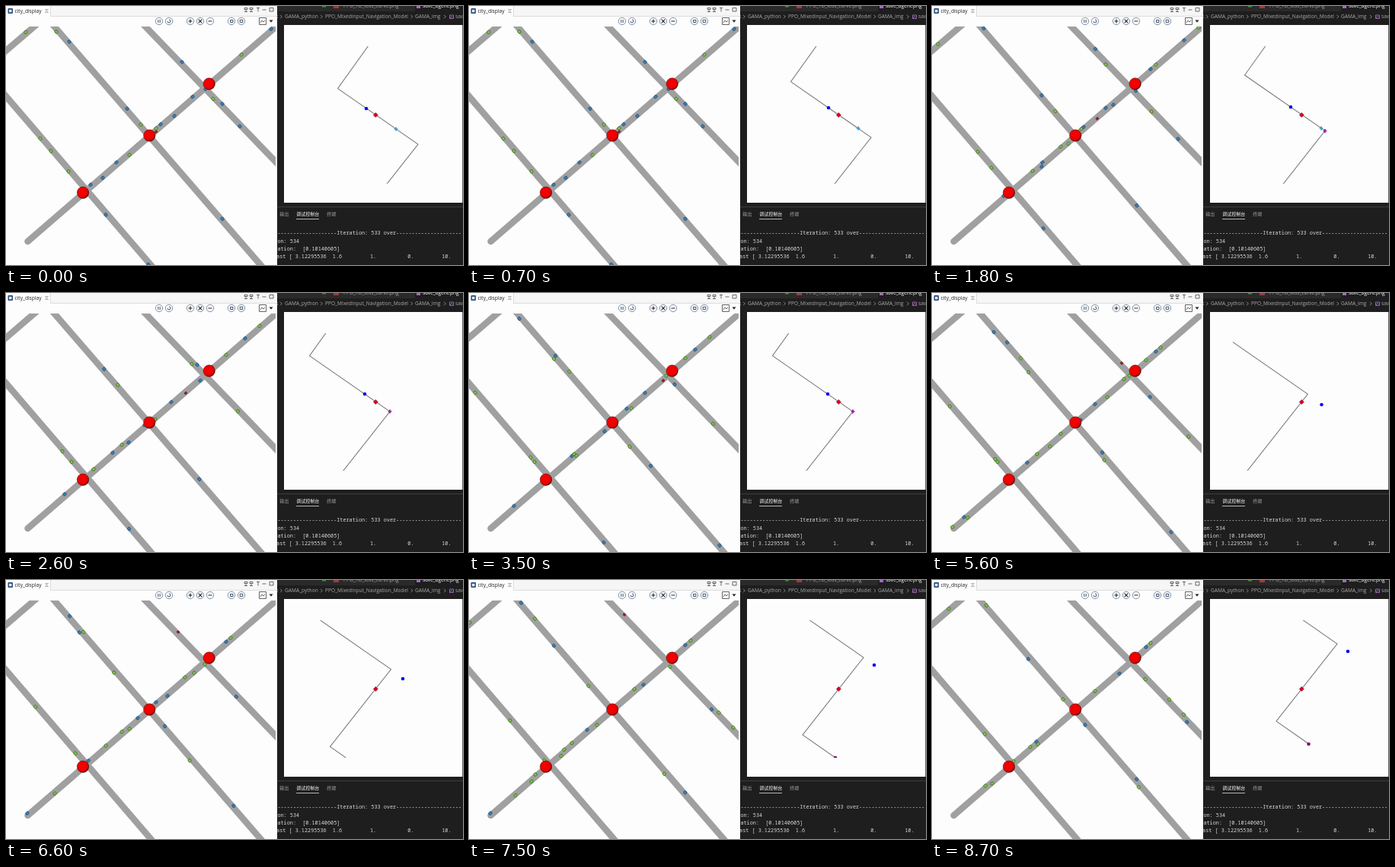
Animation of 600x341 px, one loop 8800 ms. Source, as an HTML page:

```html
<!DOCTYPE html>
<html lang="en">
<head>
<meta charset="utf-8">
<title>city_display</title>
<style>
html, body { margin: 0; width: 100%; height: 100%; overflow: hidden; background: #1e1e1e; }
svg { display: block; width: 100vw; height: 100vh; }
text { white-space: pre; }
.ui { font-family: "Open Sans", "Noto Sans", sans-serif; font-size: 6.6px; fill: #a9a9a9; }
.cjk { font-family: "Noto Sans CJK SC", "Noto Sans CJK", sans-serif; font-size: 6px; fill: #a0a0a0; }
.mono { font-family: "Noto Sans Mono", monospace; font-size: 6.83px; fill: #d8d8d8; }
.on { fill: #fff; }
</style>
</head>
<body>
<svg viewBox="0 0 600 341" preserveAspectRatio="none">
  <defs>
    <clipPath id="city"><rect y="27" width="354" height="314"/></clipPath>
    <clipPath id="view"><rect x="395" y="53" width="180" height="181"/></clipPath>
    <clipPath id="dark"><rect x="356" width="244" height="341"/></clipPath>
    <radialGradient id="ball" cx=".44" cy=".43" r=".6">
      <stop offset="0" stop-color="#fa0000"/>
      <stop offset=".76" stop-color="#ea0000"/>
      <stop offset="1" stop-color="#300"/>
    </radialGradient>
  </defs>

  <rect width="356" height="341" fill="#fdfdfd"/>
  <rect x="58" width="298" height="13" fill="#f6f6f6"/>
  <path d="M58.500 0V13M58 13.500H356" stroke="#ddd" fill="none"/>
  <rect x="2.500" y="3" width="6.500" height="7" rx="1" fill="#2c4c7c"/>
  <rect x="4" y="4.800" width="3.500" height="3.500" fill="#dce9f4"/>
  <text x="11.500" y="9.300" font-family="Open Sans, sans-serif" font-size="6.600" fill="#222">city_display</text>
  <path d="M51.500 4.500l4 4m0-4l-4 4M51.500 4.500h4M51.500 8.500h4" stroke="#999" stroke-width=".7" fill="none"/>
  <path d="M313 2.500h4v2h-4zM315 4.500v3M313 7.500h4M320 2.500h4v2h-4zM322 4.500v3M320 7.500h4M329 2.500h4M331 2.500v5M336.500 5h5M346 2.500h5v4.500h-5z" fill="none" stroke="#444" stroke-width=".8"/>
  <g fill="none" stroke="#2c4058" stroke-width=".9">
    <g id="tools"></g>
    <path d="M199.800 18v4M202.200 18v4M212 20a2 2 0 1 0 2-2M294.500 18.500h3.500v3h-3.500zM307.200 18.300h3.600v3.400h-3.600z"/>
    <path d="M239.500 20h5M242 17.500v5M252.700 17.700l4.600 4.600m0-4.600l-4.600 4.600M265.500 20h5" stroke="#222" stroke-width="1.100"/>
    <path d="M332.500 15.500h9v9h-9zM334 22l2-3 2 2 2-2" stroke="#555"/>
  </g>
  <path d="M345.500 18.500h5l-2.500 3.200z" fill="#222"/>

  <g clip-path="url(#city)">
    <path d="M28.500 310L360 22.500M-5 113L200 352.500M55 17.200L350 359.200M173 16.600L365 216.500M-5 63.200L45 20.200" fill="none" stroke="#a0a0a0" stroke-width="8.500" stroke-linecap="round"/>
    <g id="cars"></g>
    <g id="balls" fill="url(#ball)" stroke="#400" stroke-width=".5"></g>
  </g>

  <g clip-path="url(#dark)">
    <rect x="356" width="244" height="7" fill="#2a2a2b"/>
    <rect x="537" width="63" height="7" fill="#1e1e1e"/>
    <rect x="415" width="5" height="1.500" fill="#4f8a3c"/>
    <rect x="430" width="7" height="3" fill="#a33a3a"/>
    <rect x="539" width="5" height="3" fill="#a36bc0"/>
    <g class="ui">
      <text x="443" y="2">PPO_TD_loss_curve.png</text>
      <text x="547" y="2" class="on">save_agent.png</text>
      <text x="354" y="16.200">k</text>
      <text x="366" y="16.200">GAMA_python</text>
      <text x="419" y="16.200">PPO_Mixedinput_Navigation_Model</text>
      <text x="537" y="16.200">GAMA_img</text>
      <text x="590" y="16.200">save</text>
    </g>
    <path d="M360 11.700l2.300 2.300-2.300 2.300M413 11.700l2.300 2.300-2.300 2.300M531.500 11.700l2.300 2.300-2.300 2.300M575 11.700l2.300 2.300-2.300 2.300" fill="none" stroke="#a0a0a0" stroke-width=".8"/>
    <path d="M582.500 12h5v4.500h-5zM583 16l2-2.500 2 2" fill="none" stroke="#a36bc0" stroke-width=".9"/>
    <rect x="365" y="25" width="234.300" height="234" fill="#fdfdfd"/>
    <path d="M356 264.500H600" stroke="#3c3c3c"/>
    <g class="cjk">
      <text x="359.300" y="276">输出</text>
      <text x="381.300" y="276" class="on">调试控制台</text>
      <text x="421.300" y="276">终端</text>
    </g>
    <path d="M381 280.500H411" stroke="#ddd" stroke-width=".8"/>
    <g class="mono">
      <text x="352.300" y="301">--------------------Iteration: 533 over---------------------</text>
      <text x="352.300" y="311.700">ion: 534</text>
      <text x="352.300" y="322">ration:  [0.10140605]</text>
      <text x="351" y="332.300">last [ 3.12295536  1.6         1.          0.         10.</text>
    </g>
    <g clip-path="url(#view)">
      <path id="route" fill="none" stroke="#7a7a7a" stroke-width="1.050"/>
      <g id="dots"></g>
    </g>
  </g>
</svg>
<script>
const $ = id => document.getElementById(id);
const LOOP = 8800, FRAME = 100, TICK = 1200;

$('tools').innerHTML = [201, 214, 242, 255, 268, 296, 309]
  .map(x => `<circle cx="${x}" cy="20" r="4.700" stroke="#73869e"/>`).join('');
$('balls').innerHTML = [[101, 245.7], [188.3, 170.5], [266.7, 102.5]]
  .map(([x, y]) => `<circle cx="${x}" cy="${y}" r="7.700"/>`).join('');

// Lane: a point on it, its slope, and the x travelled per tick
const lanes = {
  aw: [111, 235.3, -.865, -17], ae: [127, 226.3, -.867, 17],
  bd: [45, 174.5, 1.167, 15.3],
  cu: [83, 47, 1.16, -15.1], cd: [81, 51.3, 1.163, 15.1],
  du: [214, 56, 1.04, -16.5], dd: [272, 122.3, 1.03, 16.2],
  e: [0, 57, -.87, -18]
};
const paint = {
  g: 'fill="#8fc35a" stroke="#43821f"',
  b: 'fill="#3c80b8" stroke="#2f5c84"',
  r: 'fill="#b01828" stroke="#5a1420"'
};
const cars = [];
// Free-flowing car
const go = (lane, col, first, last, x) =>
  cars.push({ lane, col, first, last, at: n => x + n * lanes[lane][3] });
// Car that slows, queues or turns off
const via = (lane, col, first, ...xs) =>
  cars.push({ lane, col, first, last: first + xs.length - 1, at: n => xs[n] });

go('cu', 'g', 0, 7, 177);
go('cu', 'b', 0, 6, 159);
go('cu', 'b', 0, 1, 83);
go('cu', 'b', 0, 5, 284);
go('cu', 'b', 3, 7, 329);
go('cd', 'g', 0, 0, 66);
go('cd', 'g', 3, 7, 111.5);
go('cd', 'b', 3, 7, 66);
go('cd', 'g', 3, 7, 211);
go('cd', 'b', 7, 7, 201);

via('bd', 'g', 0, 45, 60, 74, 81, 83, 91, 99);
via('bd', 'g', 0, 59, 78, 86, 86, 86);
go('bd', 'g', 0, 0, 82);
go('bd', 'b', 0, 3, 131);
go('bd', 'b', 0, 0, 187);
go('bd', 'g', 3, 7, 8);

go('ae', 'b', 0, 7, 127);
go('ae', 'b', 0, 2, 221);
go('ae', 'b', 0, 0, 262);
go('ae', 'g', 0, 5, 162);
via('ae', 'g', 3, 141, 155, 162, 168, 185);
via('ae', 'g', 4, 47, 64, 82);
via('ae', 'g', 5, 104, 121, 139);
via('ae', 'g', 6, 61, 79);

via('aw', 'b', 0, 111, 94, 77, 59, 42, 28, 28);
via('aw', 'b', 0, 145, 145, 140, 135, 125, 108);
via('aw', 'g', 1, 132, 115);
via('aw', 'g', 0, 197, 196);
via('aw', 'b', 0, 203, 199, 182);
via('aw', 'b', 0, 245, 228, 217, 207, 190, 173, 155, 137);
via('aw', 'g', 1, 169, 152, 138, 138, 131, 125, 107);
via('aw', 'b', 1, 287, 270);
via('aw', 'b', 3, 231, 214, 197);
go('aw', 'g', 4, 6, 169);
via('aw', 'g', 7, 129);
via('aw', 'g', 4, 252, 235, 217, 214);
via('aw', 'g', 0, 309, 294, 289, 284, 281);
via('aw', 'b', 0, 348, 331, 314, 297, 294, 289, 284, 281);
via('aw', 'g', 1, 350, 333, 316, 300, 295, 291, 287);
via('aw', 'g', 4, 27);
go('aw', 'g', 6, 7, 87);

go('du', 'b', 0, 1, 231);
go('du', 'b', 0, 2, 284);
go('du', 'g', 6, 7, 328);
go('du', 'g', 6, 7, 347);
go('dd', 'g', 0, 4, 272);
go('dd', 'b', 0, 1, 307);
go('dd', 'b', 3, 7, 270);
via('dd', 'g', 1, 228, 244, 259, 259, 261, 264, 280);

go('e', 'g', 0, 1, 26);
via('e', 'g', 6, 1, 22);

via('ae', 'r', 0, 197, 217, 236, 255);
via('du', 'r', 4, 249, 226, 204);

function drawCity(n) {
  $('cars').innerHTML = cars.filter(c => n >= c.first && n <= c.last).map(c => {
    const [x0, y0, k] = lanes[c.lane], x = c.at(n - c.first), y = y0 + k * (x - x0);
    const turn = Math.atan(k) * 180 / Math.PI, size = c.col === 'r' ? .75 : .95;
    return `<rect x="-2.200" y="-1.800" width="4.400" height="3.600" rx="1.300" ${paint[c.col]}
      transform="translate(${x} ${y}) rotate(${turn}) scale(${size})"/>`;
  }).join('');
}

// Agent view: route corner per tick, and the vehicles nearby
const corner = [[541, 182], [528, 173], [516, 164.3], [504, 156], [490.3, 147],
  [493.3, 133], [505.5, 117.5], [518, 102], [532, 84]];
const BLUE = '#0a0af0', SKY = '#3a9ad0', PINK = '#a010a8', PLUM = '#85106a';
const near = [
  [[473, 135, BLUE], [512, 162, SKY]],
  [[472, 134, BLUE], [511, 161, SKY]],
  [[471, 133, BLUE], [511, 161, SKY], [516, 164.5, PINK]],
  [[471, 133, BLUE], [504, 156, PINK]],
  [[444, 114, BLUE], [470, 132, BLUE], [513.5, 163, PINK]],
  [[511.5, 147, BLUE]],
  [[521, 130, BLUE]],
  [[532, 112, BLUE], [481, 234, PLUM]],
  [[546, 94, BLUE], [494.5, 216, PLUM]]
];
const dot = ([x, y, c]) => c === BLUE || c === PLUM
  ? `<circle cx="${x}" cy="${y}" r="2.300" fill="${c}"/>`
  : `<path d="M${x - 2.4} ${y}h4.800M${x} ${y - 2.4}v4.800" stroke="${c}" stroke-width="1.700"/>`;

function drawAgent(n) {
  const [x, y] = corner[n];
  $('route').setAttribute('d',
    `M${x - 45.5} ${y - 157.3}L${x - 105.5} ${y - 73.3}L${x} ${y}l-80 102l43 30`);
  $('dots').innerHTML = near[n].map(dot).join('') +
    '<path d="M485.300 140.500l2.900 3-2.900 3-2.900-3z" fill="#e00018" stroke="#a0103c" stroke-width=".8"/>';
}

let city = -1, agent = -1;
function draw(now) {
  const t = Math.floor(now % LOOP / FRAME) * FRAME;
  const c = Math.floor((t + 300) / TICK), a = Math.floor((t + 1000) / TICK);
  if (c !== city) drawCity(city = c);
  if (a !== agent) drawAgent(agent = a);
}
const start = performance.now();
function loop() {
  draw(performance.now() - start);
  requestAnimationFrame(loop);
}
loop();
</script>
</body>
</html>
```
